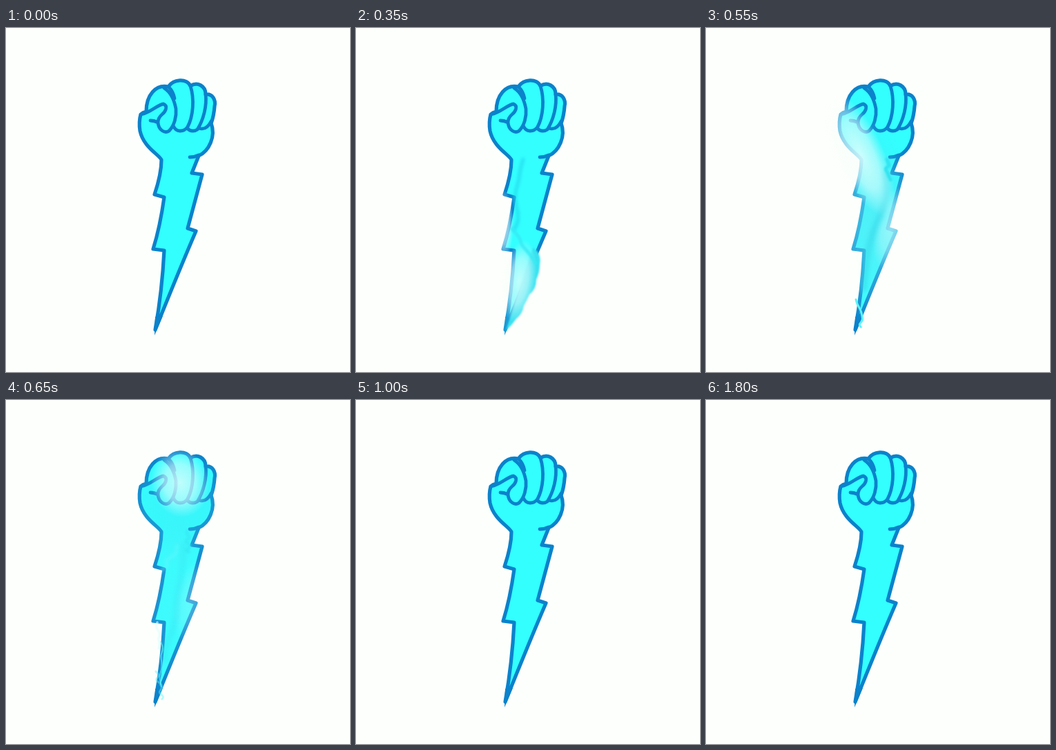
Animation, 498 px wide and 498 px high, one loop 1900 ms. Source, as an HTML page with a canvas:

```html
<!DOCTYPE html>
<html>
<head>
<meta charset="utf-8">
<style>
html, body { margin: 0; width: 100%; height: 100%; overflow: hidden; background: #fdfffc; }
canvas { display: block; }
</style>
</head>
<body>
<canvas width="498" height="498"></canvas>
<script>
const ctx = document.querySelector('canvas').getContext('2d');
const LOOP = 1900, STEP = 50;

const body = new Path2D(`M203 121 C203 97 217 81 235 85 C242 74 262 72 267 84
  C277 77 289 84 289 96 C299 95 304 104 302 113 Q301 127 297 138
  C304 157 294 178 279 185 L269 210 L284 212 L263 290 L275 294
  Q253 345 216 437 Q226 381 229 322 L213 320 Q223 288 229 245 L215 241
  Q225 211 225 191 C223 184 199 173 194 149 Q192 136 195 125 Q198 122 203 121 Z`);
const lines = new Path2D(`M196 125 C210 122 219 111 228 110 C235 113 231 121 226 125
  Q220 130 220 137 C221 148 230 153 236 149 C244 141 247 128 246 117 C243 101 237 92 229 87
  M209 134 Q215 134 220 137
  M235 85 Q242 91 244 102
  M242 141 Q245 149 252 149 Q259 149 263 143 C271 128 273 103 267 84
  M262 145 Q269 152 277 147 C286 133 291 112 289 96
  M279 145 Q290 149 297 135 M266 187 Q273 187 279 184`);
const tip = new Path2D('M216 418 L215 445 L227 417 Z');
const flare = new Path2D(`M256 318 Q269 326 266 342 Q266 354 261 364 Q261 378 251 386
  Q247 395 243 402 Q241 414 232 421 Q226 430 217 438 Z`);

// time, x, y, radius x, radius y, tilt, strength
const glow = [
  [100, 218, 450, 18, 30, 0, 0],
  [250, 224, 410, 26, 55, .1, .65],
  [350, 236, 366, 24, 60, .15, .8],
  [450, 232, 275, 30, 75, 0, .8],
  [550, 224, 184, 34, 96, -.42, .86],
  [650, 252, 120, 42, 50, -.2, .8],
  [750, 291, 101, 36, 44, 0, .78],
  [900, 298, 82, 36, 40, 0, 0]
];

function poseAt(t) {
  const i = glow.findIndex(k => k[0] > t);
  if (i < 1) return null;
  const a = glow[i - 1], b = glow[i], p = (t - a[0]) / (b[0] - a[0]);
  return a.map((v, j) => v + (b[j] - v) * p);
}

// rises and falls around a peak time
const pulse = (t, peak, width) => Math.max(0, 1 - Math.abs(t - peak) / width);
const noise = n => { const s = Math.sin(n * 127.1) * 43758.5; return s - Math.floor(s); };

function haze(x, y, rx, ry, tilt, rgb, alpha) {
  ctx.save();
  ctx.translate(x, y);
  ctx.rotate(tilt);
  ctx.scale(rx, ry);
  const g = ctx.createRadialGradient(0, 0, 0, 0, 0, 1);
  g.addColorStop(0, `rgba(${rgb},${alpha})`);
  g.addColorStop(.55, `rgba(${rgb},${alpha * .7})`);
  g.addColorStop(1, `rgba(${rgb},0)`);
  ctx.fillStyle = g;
  ctx.fillRect(-1, -1, 2, 2);
  ctx.restore();
}

function spark(x0, y0, x1, y1, sway, seed, color, width, alpha, blur) {
  if (alpha <= 0) return;
  ctx.save();
  ctx.globalAlpha = alpha;
  ctx.strokeStyle = color;
  ctx.lineWidth = width;
  ctx.filter = `blur(${blur}px)`;
  ctx.beginPath();
  let px = x0, py = y0;
  ctx.moveTo(px, py);
  for (let i = 1; i <= 7; i++) {
    const p = i / 7;
    const x = x0 + (x1 - x0) * p + (noise(seed + i) - .5) * 2 * sway;
    const y = y0 + (y1 - y0) * p;
    ctx.quadraticCurveTo(px, py, (px + x) / 2, (py + y) / 2);
    px = x;
    py = y;
  }
  ctx.stroke();
  ctx.restore();
}

function drawFist() {
  ctx.lineJoin = ctx.lineCap = 'round';
  ctx.strokeStyle = '#0b82cb';
  ctx.fillStyle = '#33ffff';
  ctx.fill(body);
  ctx.lineWidth = 5.2;
  ctx.stroke(body);
  ctx.lineWidth = 4.8;
  ctx.stroke(lines);
  ctx.fillStyle = '#0b82cb';
  ctx.fill(tip);
}

function drawEnergy(t) {
  const pose = poseAt(t);
  if (!pose) return;
  const [, x, y, rx, ry, tilt, power] = pose, seed = t / STEP * 13;
  const low = pulse(t, 350, 150), mid = pulse(t, 550, 180), late = pulse(t, 720, 180);

  ctx.save();
  ctx.globalAlpha = low;
  ctx.fillStyle = '#35e3f0';
  ctx.filter = 'blur(1px)';
  ctx.fill(flare);
  ctx.restore();

  ctx.globalCompositeOperation = 'source-atop';
  haze(x, y + 40, rx * 2.2, ry * 1.7, tilt, '70,224,240', power * .4);
  haze(240, 300, 60, 130, .1, '110,232,244', mid * .45);
  haze(268, 290, 24, 60, .2, '200,250,252', mid * .6);
  haze(214, 285, 14, 50, 0, '215,252,252', low * .8);
  spark(242, 190, 228, 300, 7, seed + 3, '#22d6ea', 5, low * .7, 2);
  spark(258, 210, 230, 390, 8, seed + 5, '#35d8ea', 8, mid * .6, 3);
  spark(248, 210, 226, 250, 8, seed + 7, '#70f8fc', 4, late * .7, 2);
  haze(x, y, rx, ry, tilt, '226,255,253', power);

  ctx.globalCompositeOperation = 'destination-over';
  haze(x, y, rx * 1.2, ry, tilt, '200,250,252', power * .1);

  ctx.globalCompositeOperation = 'source-over';
  spark(226, 290, 263, 345, 4, seed + 17, '#38eaf4', 5, low * .8, 1);
  spark(262, 190, 264, 222, 5, seed + 19, '#32e4f0', 5, mid, 1);
  spark(217, 393, 226, 436, 5, seed + 23, '#5cf4f8', 3, mid, .5);
  spark(219, 322, 222, 362, 3, seed + 29, '#e0fffc', 3.5, late, .5);
  spark(224, 350, 225, 420, 4, seed + 31, '#64f5fa', 2, late, .4);
}

function frame(now) {
  const t = Math.floor(now % LOOP / STEP) * STEP;
  ctx.clearRect(0, 0, 498, 498);
  drawFist();
  drawEnergy(t);
  ctx.globalCompositeOperation = 'source-over';
  requestAnimationFrame(frame);
}
requestAnimationFrame(frame);
</script>
</body>
</html>
```
